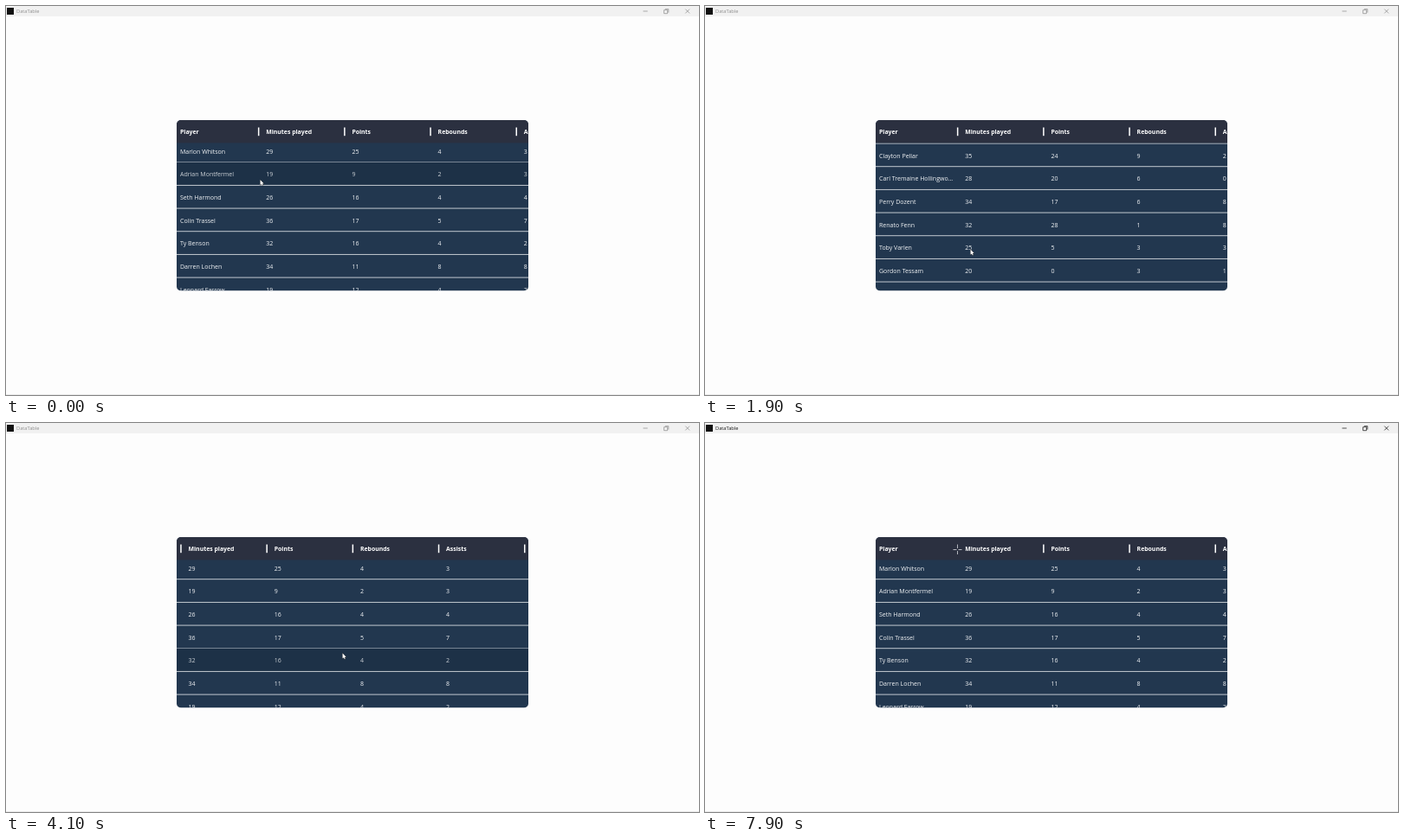
An HTML page with a canvas for the animation above (8000 ms loop, 800 by 450 pixels).

```html
<!DOCTYPE html>
<html lang="en">
<head>
<meta charset="utf-8">
<title>DataTable</title>
<style>
  html, body { margin: 0; width: 100%; height: 100%; overflow: hidden; background: #fdfdfd; }
  canvas { display: block; }
</style>
</head>
<body>
<canvas id="stage" width="800" height="450"></canvas>
<script>
const ctx = document.getElementById('stage').getContext('2d');
const LOOP = 8000, STEP = 100;
const FONT = '"Open Sans", "Noto Sans", sans-serif';
const BOX = { x: 197, y: 132, w: 406, h: 197.5 };
const HEAD_H = 26.4, ROW_H = 26.67, ROWS_Y = 154, COL_W = 99.2;

const columns = ['Player', 'Minutes played', 'Points', 'Rebounds', 'Assists'];
const rows = `Marlon Whitson,29,25,4,3
Adrian Montfermel,19,9,2,3
Seth Harmond,26,16,4,4
Colin Trassel,36,17,5,7
Ty Benson,32,16,4,2
Darren Lochen,34,11,8,8
Leonard Farrow,19,12,4,2
Emil Kestan,22,7,3,1
Adrian Montfermel,19,9,2,3
Hugh McLennock,9,0,0,2
Tobias Crelham,8,0,1,0
Giles Pondrey,39,23,6,3
Clayton Pellar,35,24,9,2
Carl Tremaine Hollingwo...,28,20,6,0
Perry Dozent,34,17,6,8
Renato Fenn,32,28,1,8
Toby Varlen,25,5,3,3
Gordon Tessam,20,0,3,1
Rick Dalby Jr,18,5,3,0
Otis Brandley,11,2,1,1
Ivor Castlin,6,0,2,0`.split('\n').map(line => line.split(','));

// Keyframes: time followed by one or more values
const scrollY = [[0, 0], [400, 0], [1300, 318.8], [1600, 385], [1700, 385], [2200, 210.1], [2500, 0]];
const scrollX = [[3200, 0], [4100, 89.7], [4500, 89.7], [5100, 0]];
const pointer = [
  [0, 293.5, 201], [500, 306.5, 281.5], [2800, 306.5, 281.5], [3200, 370.5, 273],
  [4100, 388.5, 266.3], [5200, 388.5, 266.3], [5500, 385, 244], [5600, 385, 244],
  [6300, 308, 165.3], [6500, 308, 165.3], [7400, 291.5, 146], [8000, 291.5, 146]
];

function at(keys, t) {
  const i = keys.findIndex(k => k[0] > t);
  if (i < 0) return keys[keys.length - 1].slice(1);
  if (i === 0) return keys[0].slice(1);
  const a = keys[i - 1], b = keys[i], u = (t - a[0]) / (b[0] - a[0]);
  return a.slice(1).map((v, n) => v + (b[n + 1] - v) * u);
}

function rect(x, y, w, h, color) {
  ctx.fillStyle = color;
  ctx.fillRect(x, y, w, h);
}

function text(str, x, y, size, color, weight = 400) {
  ctx.font = `${weight} ${size}px ${FONT}`;
  ctx.fillStyle = color;
  ctx.fillText(str, x, y);
}

function stroke(d, color, width) {
  ctx.strokeStyle = color;
  ctx.lineWidth = width;
  ctx.stroke(new Path2D(d));
}

function drawWindow(active) {
  const ink = active ? '#1a1a1a' : '#8f8f8f';
  rect(0, 0, 800, 450, '#fdfdfd');
  rect(0, 0, 800, 12, '#f1f1f1');
  rect(0, 449, 800, 1, '#ececec');
  rect(1, 2, 8, 8, '#111');
  text('DataTable', 12, 8.2, 5.7, ink);
  stroke('M735.5 6H740.7M759.6 4.7h4v4h-4zM760.8 3.6h4v4M784.3 3.6l4.8 4.8M789.1 3.6l-4.8 4.8', ink, 0.75);
}

function drawTable(sx, sy, hover, hideGrip) {
  const left = BOX.x - sx;
  ctx.save();
  ctx.beginPath();
  ctx.roundRect(BOX.x, BOX.y, BOX.w, BOX.h, 5);
  ctx.clip();
  rect(BOX.x, BOX.y, BOX.w, BOX.h, '#22374f');
  rows.forEach((row, i) => {
    const y = ROWS_Y + i * ROW_H - sy;
    if (y > 330 || y < 125) return;
    if (i === hover) rect(BOX.x, y, BOX.w, ROW_H, '#1d3147');
    rect(BOX.x, y + ROW_H - 0.4, BOX.w, 0.9, '#d3d8de');
    row.forEach((cell, c) =>
      text(cell, left + 4 + c * COL_W, y + 16.5, 7, i === hover ? '#ccd1d6' : '#f2f4f6'));
  });
  rect(BOX.x, BOX.y, BOX.w, HEAD_H, '#2b3040');
  columns.forEach((name, c) => {
    text(name, left + 4 + c * COL_W, 148.3, 6.9, '#fff', 700);
    if (c || !hideGrip) rect(left + 93.9 + c * COL_W, 140.5, 1.5, 9.7, '#fff');
  });
  ctx.restore();
}

function drawPointer(x, y, shape) {
  ctx.save();
  ctx.translate(x, y);
  if (shape === 'cross') {
    stroke('M-5 .5H-1M1 .5H5M0 -5.5V-1M0 2V6', '#d8dade', 0.8);
  } else if (shape === 'beam') {
    stroke('M-.5 -1h2.2M.6 -1v5.5M-.5 4.5h2.2', '#c4cad2', 0.7);
  } else {
    const arrow = new Path2D('M0 0V6.2L1.4 5L2.3 7L3.3 6.6L2.4 4.6L4.2 4.4Z');
    ctx.strokeStyle = '#111';
    ctx.lineWidth = 0.7;
    ctx.stroke(arrow);
    ctx.fillStyle = '#fff';
    ctx.fill(arrow);
  }
  ctx.restore();
}

function draw(t) {
  const [sy] = at(scrollY, t), [sx] = at(scrollX, t), [x, y] = at(pointer, t);
  const onGrip = t >= 7400;
  const scrolling = t >= 400 && t < 2600;
  const inHead = y < BOX.y + HEAD_H;
  const hover = scrolling || inHead ? -1 : Math.floor((y - ROWS_Y + sy) / ROW_H);
  drawWindow(t >= 6000);
  drawTable(sx, sy, hover, onGrip);
  drawPointer(x, y, onGrip ? 'cross' : t >= 2000 && t < 2600 ? 'beam' : 'arrow');
}

const start = performance.now();
function frame() {
  const t = (performance.now() - start) % LOOP;
  draw(Math.floor(t / STEP) * STEP);
  requestAnimationFrame(frame);
}
frame();
</script>
</body>
</html>
```
